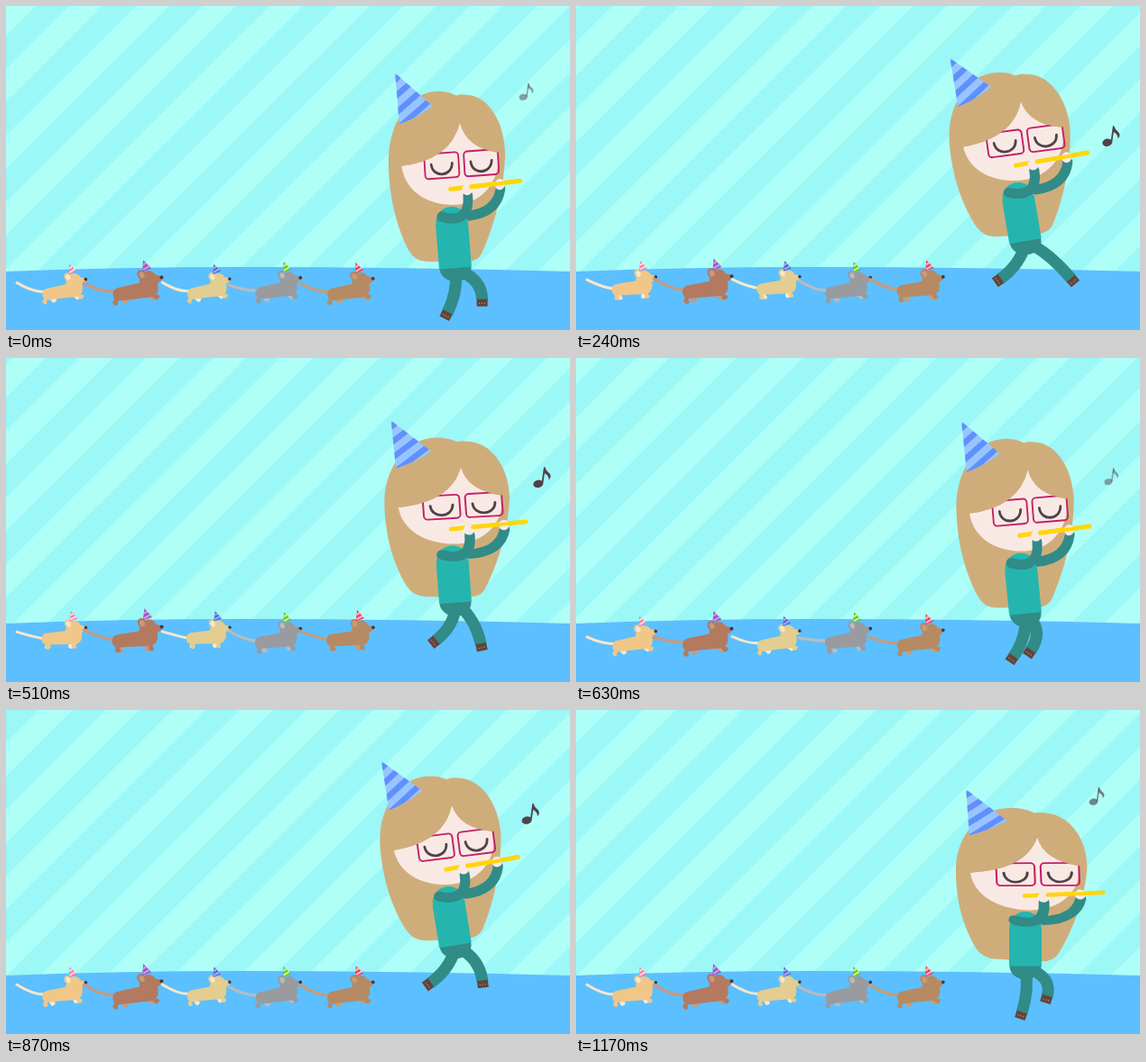
Recreate the animation shown at these times as an HTML page with a canvas. Size 625 px wide and 360 px high, loop 1200 ms.

```html
<!DOCTYPE html>
<html lang="en">
<head>
<meta charset="utf-8">
<title>Flute parade</title>
<style>
html, body { margin: 0; width: 100%; height: 100%; overflow: hidden; background: #aefff8; }
canvas { display: block; }
</style>
</head>
<body>
<canvas id="stage" width="625" height="360"></canvas>
<script>
const ctx = document.getElementById('stage').getContext('2d');
const LOOP = 1200, STEP = 600, TICK = 30, TAU = Math.PI * 2;
const TAN = '#cfad7b', SKIN = '#f9e9e4', TEAL = '#24b6ae', SLEEVE = '#318b86', INK = '#51414a';

// Neck x, y, tilt in degrees, horizontal stretch
const LAND = [496, 223, 4.5, 1.09], PUSH = [492, 222, 2, .97];
const RISE = [488, 195, -2, 1.01], FLOAT = [490, 195, 0, 1];
// Feet, relative to the hip
const PLANT = [-4, 52], BACK = [-28, 42];
const STRIDES = [{ from: [20, 34], to: [47, 42] }, { from: [-14, 42], to: [26, 40] }];
const NOTES = [
  { start: 120, life: 600, from: [588, 160], to: [590, 137] },
  { start: 660, life: 640, from: [582, 150], to: [573, 100] }
];
const DOGS = [
  { x: 64, y: 283, size: 1, lag: 15, coat: '#f0c788', light: '#fbe6cc', hat: ['#ff7fa5', '#ffe3ea'] },
  { x: 145, y: 278.5, size: 1.13, lag: -10, coat: '#b37a5f', light: '#c49a84', hat: ['#9459c4', '#d79be0'] },
  { x: 224, y: 283, size: .98, lag: 15, coat: '#e3cd90', light: '#f6e9c8', hat: ['#5968cf', '#a3b5f5'] },
  { x: 301, y: 281, size: 1.04, lag: -30, coat: '#999b9f', light: '#b9bbbf', hat: ['#55c94b', '#e8f56c'] },
  { x: 381, y: 281, size: 1.06, lag: 0, coat: '#b68a63', light: '#c79c77', hat: ['#f0405f', '#ffc0c8'] }
];

const clamp = p => Math.min(1, Math.max(0, p));
const easeIn = p => p * p;
const easeOut = p => 1 - (1 - p) ** 2;
const mix = (a, b, p) => a.map((v, i) => v + (b[i] - v) * p);

function fill(path, color) {
  ctx.fillStyle = color;
  ctx.fill(new Path2D(path));
}
function line(path, color, width, cap = 'round') {
  ctx.strokeStyle = color;
  ctx.lineWidth = width;
  ctx.lineCap = cap;
  ctx.lineJoin = 'round';
  ctx.stroke(new Path2D(path));
}
function oval(x, y, rx, ry, color, turn = 0) {
  ctx.fillStyle = color;
  ctx.beginPath();
  ctx.ellipse(x, y, rx, ry, turn, 0, TAU);
  ctx.fill();
}
function group(draw) {
  ctx.save();
  draw();
  ctx.restore();
}

function drawBackground(t) {
  const period = 74;
  ctx.fillStyle = '#aefff8';
  ctx.fillRect(0, 0, 625, 360);
  const start = 33 - period * (t % STEP) / STEP;
  for (let x = start - period; x < 1000; x += period)
    fill(`M${x} 0h37l-360 360h-37z`, '#9cf7f7');
  fill('M0 295Q130 290 260 290Q440 290 625 295V360H0Z', '#5cbfff');
}

function drawDog(dog, t) {
  const phase = TAU * (t - dog.lag) / 300;
  const swing = Math.cos(phase), bob = 3.5 * swing;
  group(() => {
    ctx.translate(dog.x, dog.y + bob);
    ctx.scale(dog.size, dog.size);
    line(`M-22 31Q-34 ${30 + swing * 2} -52 ${25 + 4 * Math.sin(phase + .2) - bob}`, dog.light, 3);
    ctx.translate(10, 20);
    ctx.rotate(-.06 * (1 + swing));
    ctx.translate(-10, -20);
    const leg = (x, turn, color) => group(() => {
      ctx.translate(x, 34);
      ctx.rotate(turn);
      line('M0 0V6h1.500', color, 4);
    });
    leg(-17, -swing * .7, dog.light);
    leg(9, -swing * .8, dog.light);
    fill('M-25 31Q-25 24 -17 24L2 22Q3 12 11 11Q17 11 19 16L25 18Q26 22 20 24Q21 37 11 37H-17Q-25 37 -25 31Z', dog.coat);
    leg(-20, .1 + swing * .7, dog.coat);
    leg(13, -swing * .8, dog.coat);
    oval(5, 14, 4, 4.8, dog.coat, -.3);
    oval(5.5, 14.5, 2.5, 3.2, dog.light, -.3);
    oval(24.5, 19, 1.8, 1.8, '#443940');
    fill('M8.500 0L15.500 9L6.500 11.500Z', dog.hat[0]);
    line('M8 5L11 3M7.500 9.500L14 6.500', dog.hat[1], 1.8, 'butt');
  });
}

// The knee bends forward as the leg shortens.
function drawLeg(hipX, hipY, [dx, dy]) {
  const bend = .8 * (60 - Math.hypot(dx, dy));
  const kx = dx / 2 + bend, ky = dy / 2 - dx * .2;
  group(() => {
    ctx.translate(hipX, hipY);
    line(`M0 3Q${kx} ${ky} ${dx} ${dy}`, SLEEVE, 13, 'butt');
    ctx.translate(dx, dy);
    ctx.rotate(Math.atan2(dy - ky, dx - kx));
    ctx.fillStyle = '#634338';
    ctx.fillRect(-1, -6, 8, 12);
    ctx.fillStyle = '#b98f7b';
    for (const y of [-3, 0, 3]) ctx.fillRect(3, y - .5, 1.2, 1.2);
  });
}

function drawHat() {
  group(() => {
    const cone = new Path2D('M422 54L466 88Q450 101 429 109Z');
    ctx.fillStyle = '#98c5ff';
    ctx.fill(cone);
    ctx.clip(cone);
    for (let i = 0; i < 4; i++)
      line(`M410 ${72 + i * 19}l70 -62`, '#6090fb', 6.5, 'butt');
  });
}

function drawFace() {
  fill('M498 105Q489 146 433 154C438 180 462 194 491 194C523 194 547 170 543 136Q506 132 498 105Z', SKIN);
  for (const [x, y] of [[479, 152], [524, 147.5]]) group(() => {
    ctx.translate(x, y);
    ctx.rotate(-.1);
    ctx.strokeStyle = '#c41f68';
    ctx.lineWidth = 1.9;
    ctx.beginPath();
    ctx.roundRect(-19.5, -13.5, 39, 27, 4);
    ctx.stroke();
    line('M-12 -2C-11 13 11 13 12 -2', INK, 2.8);
  });
  fill('M498 105Q489 146 433 154L445 105L498 90L540 110L543 136Q506 132 498 105Z', TAN);
}

function drawFlute() {
  line('M490 177L569 165.500', '#ffd60a', 5);
  for (const x of [549, 553, 557]) oval(x, 168 - (x - 549) * .14, 1, 1, '#c98a1c');
  oval(509, 177, 6, 6, SKIN);
  oval(546, 170, 5.5, 6, SKIN);
  line('M513 174L568 166', '#ffd60a', 4);
}

function bodyPose(s) {
  if (s < .05) return mix(LAND, PUSH, s / .05);
  if (s < .45) return mix(PUSH, RISE, easeOut((s - .05) / .4));
  if (s < .7) return mix(RISE, FLOAT, (s - .45) / .25);
  return mix(FLOAT, LAND, easeIn((s - .7) / .3));
}

function drawGirl(t) {
  const steps = (t + TICK) / STEP, s = steps % 1;
  const stride = STRIDES[Math.floor(steps) % 2], next = STRIDES[Math.floor(steps + 1) % 2];
  const [x, y, tilt, sx] = bodyPose(s);
  const hipX = 498, hipY = y + 67 / sx;
  const inHead = draw => group(() => {
    ctx.translate(x, y);
    ctx.rotate(tilt * Math.PI / 180);
    ctx.scale(sx, 1 / sx);
    ctx.translate(-490, -195);
    draw();
  });
  inHead(() => {
    fill('M493 76C476 68 453 72 440 86C424 103 417 125 418 150C420 190 431 222 445 245Q452 256 466 256L510 255Q525 254 529 243C544 208 551 170 551 138C549 101 528 75 505 75Q498 74 493 76Z', TAN);
    line('M511 205C535 202 545 190 547 175', SLEEVE, 11);
  });
  const spread = easeOut(clamp(s / .45)), fall = easeIn(clamp((s - .7) / .3));
  drawLeg(hipX + 4, hipY, mix(mix(stride.from, stride.to, spread), PLANT, fall));
  drawLeg(hipX, hipY, mix(mix(PLANT, BACK, spread), next.from, fall));
  oval(hipX, hipY, 17.5, 15, SLEEVE);
  oval(x + 2, y + 18, 17.5, 17, TEAL);
  line(`M${x + 2} ${y + 19}L${hipX} ${hipY}`, TEAL, 36, 'butt');
  inHead(() => {
    drawFace();
    drawHat();
    line('M481 207C500 212 513 206 510 183', SLEEVE, 11);
    drawFlute();
  });
}

function drawNote(note, t) {
  const p = (t - note.start + LOOP) % LOOP / note.life;
  if (p > 1) return;
  const alpha = clamp(Math.min(p * 8, (1 - p) * 3.2)), size = .65 + .35 * alpha;
  group(() => {
    ctx.globalAlpha = alpha;
    ctx.translate(...mix(note.from, note.to, easeOut(p)));
    ctx.scale(size, size);
    ctx.rotate(.14);
    oval(0, 0, 5.5, 4.2, INK, -.35);
    line('M4.500 -1V-19', INK, 1.8, 'butt');
    fill('M4 -20Q7 -15 11 -13Q14 -10 11 -6Q11 -11 4 -13Z', INK);
  });
}

function frame(now) {
  const t = Math.floor(now / TICK) * TICK % LOOP;
  drawBackground(t);
  DOGS.forEach(dog => drawDog(dog, t));
  drawGirl(t);
  NOTES.forEach(note => drawNote(note, t));
}

let origin;
function loop(now) {
  origin ??= now;
  frame(Math.max(0, now - origin));
  requestAnimationFrame(loop);
}
frame(0);
requestAnimationFrame(loop);
</script>
</body>
</html>
```
